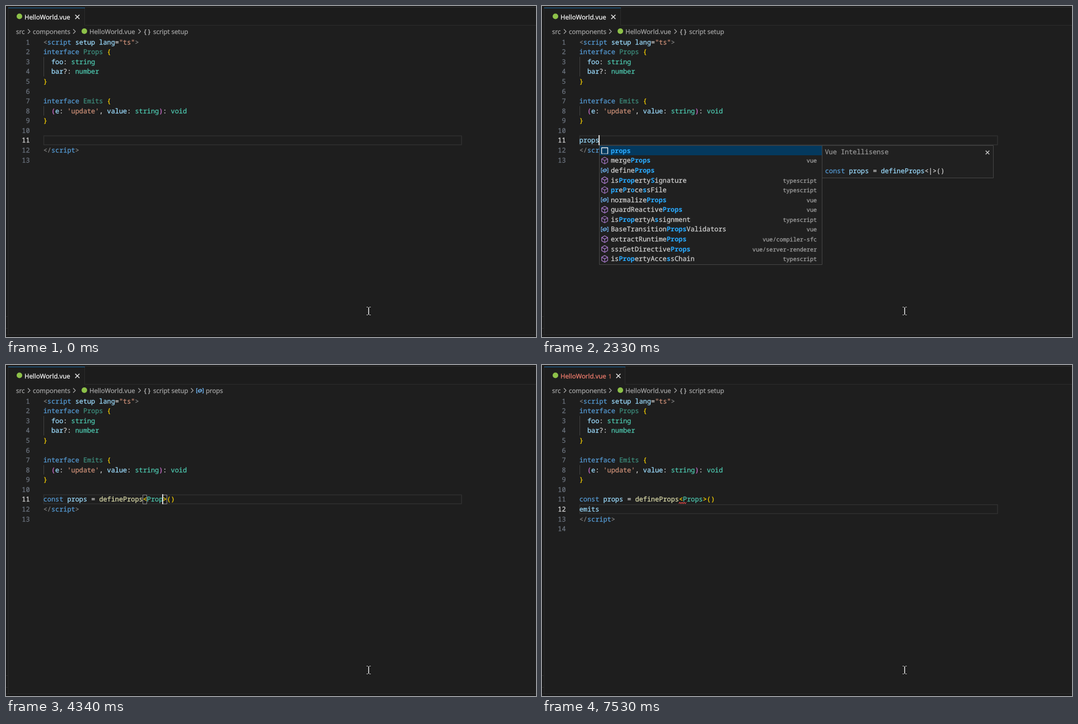
Recreate the animation shown at these times as an HTML page with a canvas. Size 947x592 px, loop 8 s.

```html
<!DOCTYPE html>
<html lang="en">
<head>
<meta charset="utf-8">
<title>Editor completion</title>
<style>
html, body { margin: 0; width: 100%; height: 100%; overflow: hidden; background: #1e1e1e; }
canvas { display: block; width: 947px; height: 592px; }
</style>
</head>
<body>
<canvas id="stage" width="947" height="592"></canvas>
<script>
const ctx = document.getElementById('stage').getContext('2d');
ctx.textRendering = 'geometricPrecision';

const LOOP = 8000;
const MONO = '"Noto Sans Mono", monospace';
const CODE = '11.86px ' + MONO;
const UI = '11.45px "Open Sans", sans-serif';
const CHAR = 7.12, LINE = 17.58, LEFT = 66.7, TOP = 55.6;

const C = {
  bg: '#1e1e1e', bar: '#1c1c1c', dark: '#181818', line: '#2b2b2b', text: '#d4d4d4', dim: '#808080',
  key: '#569cd6', name: '#9cdcfe', type: '#4ec9b0', unused: '#3e907f', str: '#ce9178',
  fn: '#dcdcaa', gold: '#ffd700', pink: '#da70d6', ui: '#a9a9a9', match: '#2aaaff',
  method: '#b180d7', value: '#75beff', leaf: '#8dc149', error: '#f88070'
};

const HEAD = [
  [['<', C.dim], ['script', C.key], [' setup lang', C.name], ['=', C.text], ['"ts"', C.str], ['>', C.dim]],
  [['interface ', C.key], ['Props ', C.unused], ['{', C.gold]],
  [['  foo', C.name], [': ', C.text], ['string', C.type]],
  [['  bar', C.name], ['?: ', C.text], ['number', C.type]],
  [['}', C.gold]],
  [],
  [['interface ', C.key], ['Emits ', C.unused], ['{', C.gold]],
  [['  (', C.pink], ['e', C.name], [': ', C.text], ["'update'", C.str], [', ', C.text], ['value', C.name],
    [': ', C.text], ['string', C.type], [')', C.pink], [': ', C.text], ['void', C.type]],
  [['}', C.gold]],
  []
];
const TAIL = [['</', C.dim], ['script', C.key], ['>', C.dim]];

// Matched letters are wrapped in * marks.
const ITEMS = [
  ['snippet', '*props*', ''],
  ['method', 'merge*Props*', 'vue'],
  ['value', 'define*Props*', ''],
  ['method', 'is*Prop*erty*S*ignature', 'typescript'],
  ['method', '*pr*e*P*r*o*ce*s*sFile', 'typescript'],
  ['value', 'normalize*Props*', 'vue'],
  ['method', 'guardReactive*Props*', 'vue'],
  ['method', 'is*Prop*ertyA*s*signment', 'typescript'],
  ['value', 'BaseTransition*Props*Validators', 'vue'],
  ['method', 'extractRuntime*Props*', 'vue/compiler-sfc'],
  ['method', 'ssrGetDirective*Props*', 'vue/server-renderer'],
  ['method', 'is*Prop*ertyAcce*s*sChain', 'typescript']
];

// Key presses: [time, text so far]
const WORD_1 = [[0, ''], [1500, 'p'], [1600, 'pr'], [1690, 'pro'], [1840, 'prop'], [2010, 'props']];
const GENERIC = [[0, ''], [3790, 'P'], [3910, 'Pr'], [4130, 'Pro'], [4340, 'Prop'], [4460, 'Props']];
const WORD_2 = [[0, ''], [6450, 'e'], [6690, 'em'], [6800, 'emi'], [6970, 'emit'], [7030, 'emits']];
const CARET = [[0, 0], [400, 1], [880, 0], [1410, 1], [2520, 0], [2970, 1], [5280, 0],
  [5680, 1], [6120, 0], [6450, 1], [7530, 0]];
const SLIDER = [[0, 0], [2520, 0.25], [2780, 0.4], [3280, 0]];

const at = (keys, t) => keys.filter(k => k[0] <= t).pop()[1];
const between = (t, a, b) => t >= a && t < b;
const lineTop = n => TOP + (n - 1) * LINE;

function box(x, y, w, h, color) {
  ctx.fillStyle = color;
  ctx.fillRect(x, y, w, h);
}

function frame(x, y, w, h, color, width = 1) {
  ctx.strokeStyle = color;
  ctx.lineWidth = width;
  ctx.strokeRect(x + width / 2, y + width / 2, w - width, h - width);
}

function path(points, color, width = 1, close = false) {
  ctx.beginPath();
  points.forEach(([x, y]) => ctx.lineTo(x, y));
  if (close) ctx.closePath();
  ctx.strokeStyle = color;
  ctx.lineWidth = width;
  ctx.stroke();
}

// A hairline outline gives the text its slightly heavier weight.
function label(s, x, y, color, font = UI, align = 'left') {
  ctx.font = font;
  ctx.textAlign = align;
  ctx.fillStyle = ctx.strokeStyle = color;
  ctx.lineWidth = font.startsWith('bold') ? 0.05 : 0.25;
  ctx.lineJoin = 'round';
  ctx.fillText(s, x, y);
  ctx.strokeText(s, x, y);
}

function code(parts, x, y) {
  for (const [s, color, weight = ''] of parts) {
    label(s, x, y, color, weight + CODE);
    x += s.length * CHAR;
  }
}

function dot(x, y) {
  ctx.beginPath();
  ctx.arc(x, y, 5, 0, 7);
  ctx.fillStyle = C.leaf;
  ctx.fill();
}

function cross(x, y, r, color) {
  path([[x - r, y - r], [x + r, y + r]], color, 1.3);
  path([[x + r, y - r], [x - r, y + r]], color, 1.3);
}

function chevron(x, y) {
  path([[x - 2, y - 4], [x + 2, y], [x - 2, y + 4]], C.ui, 1.1);
}

const icons = {
  method(x, y) {
    path([[x, y - 6], [x + 5.3, y - 3], [x + 5.3, y + 3], [x, y + 6], [x - 5.3, y + 3], [x - 5.3, y - 3]], C.method, 1.1, true);
    path([[x - 5.3, y - 3], [x, y], [x + 5.3, y - 3]], C.method, 1.1);
    path([[x, y], [x, y + 6]], C.method, 1.1);
  },
  value(x, y) {
    for (const d of [-1, 1])
      path([[x + d * 4, y - 4], [x + d * 6, y - 4], [x + d * 6, y + 4], [x + d * 4, y + 4]], C.value, 1.1);
    path([[x - 3.3, y - 0.5], [x + 0.8, y - 2.8], [x + 3.3, y - 1.2], [x + 3.3, y + 1],
      [x - 0.8, y + 3], [x - 3.3, y + 1.5]], C.value, 1.1, true);
    path([[x - 3.3, y - 0.5], [x - 0.8, y + 0.8], [x + 3.3, y - 1.2]], C.value, 1);
  },
  snippet(x, y) {
    const top = Math.round(y) - 5.5;
    path([[x - 5.5, top + 11], [x - 5.5, top], [x + 5.5, top], [x + 5.5, top + 11]], '#f0f0f0', 1.3);
    for (let i = -4.5; i < 5; i += 2.5) box(x + i, top + 10, 1.5, 1.2, '#f0f0f0');
  }
};

function drawShell(t) {
  const failed = t >= 5070, tabEnd = failed ? 149 : 141;
  box(0, 0, 947, 592, C.bg);
  box(0, 0, 947, 34, C.bar);
  box(0, 2, 947, 1, C.line);
  box(0, 34, 947, 1, C.line);
  box(4, 3, tabEnd - 4, 32, C.bg);
  box(4, 3, tabEnd - 4, 1, '#14649f');
  box(tabEnd - 1, 4, 1, 31, C.line);
  box(0, 0, 3, 592, C.dark);
  box(3, 3, 1, 586, C.line);
  box(0, 555, 3, 1, C.line);
  box(0, 576, 3, 1, C.line);
  box(0, 588, 947, 4, C.dark);
  box(0, 588, 947, 1, C.line);

  dot(24, 18.5);
  label('HelloWorld.vue', 33, 24, failed ? C.error : '#ffffff');
  if (failed) label('1', 118.5, 23.5, '#d0705f', '10.6px "Open Sans", sans-serif');
  cross(failed ? 136.5 : 127.5, 19.5, 3.8, '#f0f0f0');

  label('src', 18, 50, C.ui);
  chevron(41, 45.5);
  label('components', 48, 50, C.ui);
  chevron(122, 45.5);
  dot(140, 45);
  label('HelloWorld.vue', 149, 50, C.ui);
  chevron(238.5, 45.5);
  label('{ }', 246.5, 49.5, '#c5c5c5');
  label('script setup', 263, 50, C.ui);
  if (between(t, 3790, 6280)) {
    chevron(332.5, 45.5);
    icons.value(346.5, 46);
    label('props', 357, 50, C.ui);
  }
}

function lineEleven(t) {
  if (t < 3480) return [[at(WORD_1, t), C.name]];
  if (t < 3530) return [['const props = defineProps<>()', C.text]];
  const typed = t >= 4190, mark = typed ? C.gold : C.text;
  return [['const ', C.key], ['props ', C.name], ['= ', C.text], ['defineProps', typed ? C.fn : C.name],
    ['<', mark], [at(GENERIC, t), typed ? C.type : C.name], ['>', mark], ['()', C.gold]];
}

function caretColumn(t) {
  if (t < 3480) return at(WORD_1, t).length;
  if (t < 4770) return 26 + at(GENERIC, t).length;
  return t < 5680 ? 34 : at(WORD_2, t).length;
}

function bracketBox(col) {
  frame(Math.floor(LEFT + col * CHAR), 232, 8, 17, '#888888');
}

function drawCaret(col, line) {
  const x = Math.floor(66 + col * CHAR), left = Math.max(67, x);
  box(left, Math.floor(lineTop(line)), x + 2 - left, 18, '#d8d8d8');
}

function drawCode(t) {
  const split = t >= 5680, active = split ? 12 : 11;
  const lines = [...HEAD, lineEleven(t)];
  if (split) lines.push([[at(WORD_2, t), C.name]]);
  lines.push(TAIL, []);

  frame(66.7, lineTop(active), 748, LINE, '#2f2f2f', 1.6);
  box(67, 91, 1, 35, '#404040');
  box(67, 179, 1, 17, '#404040');

  if (between(t, 4190, 4770)) [25, caretColumn(t)].forEach(bracketBox);
  if (between(t, 4770, 5680)) [32, 33].forEach(bracketBox);

  lines.forEach((parts, i) => {
    const y = Math.round(lineTop(i + 1) + 13);
    label(String(i + 1), 42.6, y, i + 1 === active ? '#dddddd' : '#6e7681', CODE, 'right');
    code(parts, LEFT, y);
  });

  if (t >= 4910) {
    const wave = [];
    for (let i = 0; i < 8; i++) wave.push([244.5 + i * 1.9, i % 2 ? 245.7 : 248]);
    path(wave, '#f14c4c', 1.1);
  }
  if (at(CARET, t)) drawCaret(caretColumn(t), active);
}

function drawItem([kind, text, from], i) {
  const top = 249.8 + i * LINE, y = Math.round(top + 13);
  icons[kind](112, top + 9);
  code(text.split('*').map((s, k) => k % 2 ? [s, C.match, 'bold '] : [s, '#d4d4d4']), 123, y);
  label(from, 491, y - 0.5, '#a4a4a4', '10.08px ' + MONO, 'right');
}

function drawPopup(t) {
  box(102, 249, 399, 214, '#202020');
  box(103, 250, 397, 17, '#04395e');
  box(491, 250, 9, 17, `rgba(121,121,121,${at(SLIDER, t)})`);
  frame(102, 249, 399, 214, '#454545');
  ITEMS.forEach(drawItem);

  box(501, 249, 306, 59, '#202020');
  frame(500, 249, 307, 59, '#454545');
  label('Vue Intellisense', 505.5, 265, '#989898', CODE);
  cross(796, 262, 3.3, '#cccccc');
  code([['const ', C.key], ['props ', C.name], ['= ', C.text], ['defineProps', C.name], ['<|>()', C.text]], 505.7, 299);
}

function drawPointer() {
  const bars = [[644, 538, 3, 1], [649, 538, 3, 1], [647, 539, 2, 13], [644, 552, 3, 1], [649, 552, 3, 1]];
  for (const [x, y, w, h] of bars) box(x - 0.5, y - 0.5, w + 1, h + 1, '#111111');
  for (const [x, y, w, h] of bars) box(x, y, w, h, '#b8b8b8');
}

function draw(now) {
  const t = now % LOOP;
  drawShell(t);
  drawCode(t);
  if (between(t, 2330, 3480)) drawPopup(t);
  drawPointer();
}

const start = performance.now();
function tick() {
  draw(performance.now() - start);
  requestAnimationFrame(tick);
}
tick();
</script>
</body>
</html>
```
